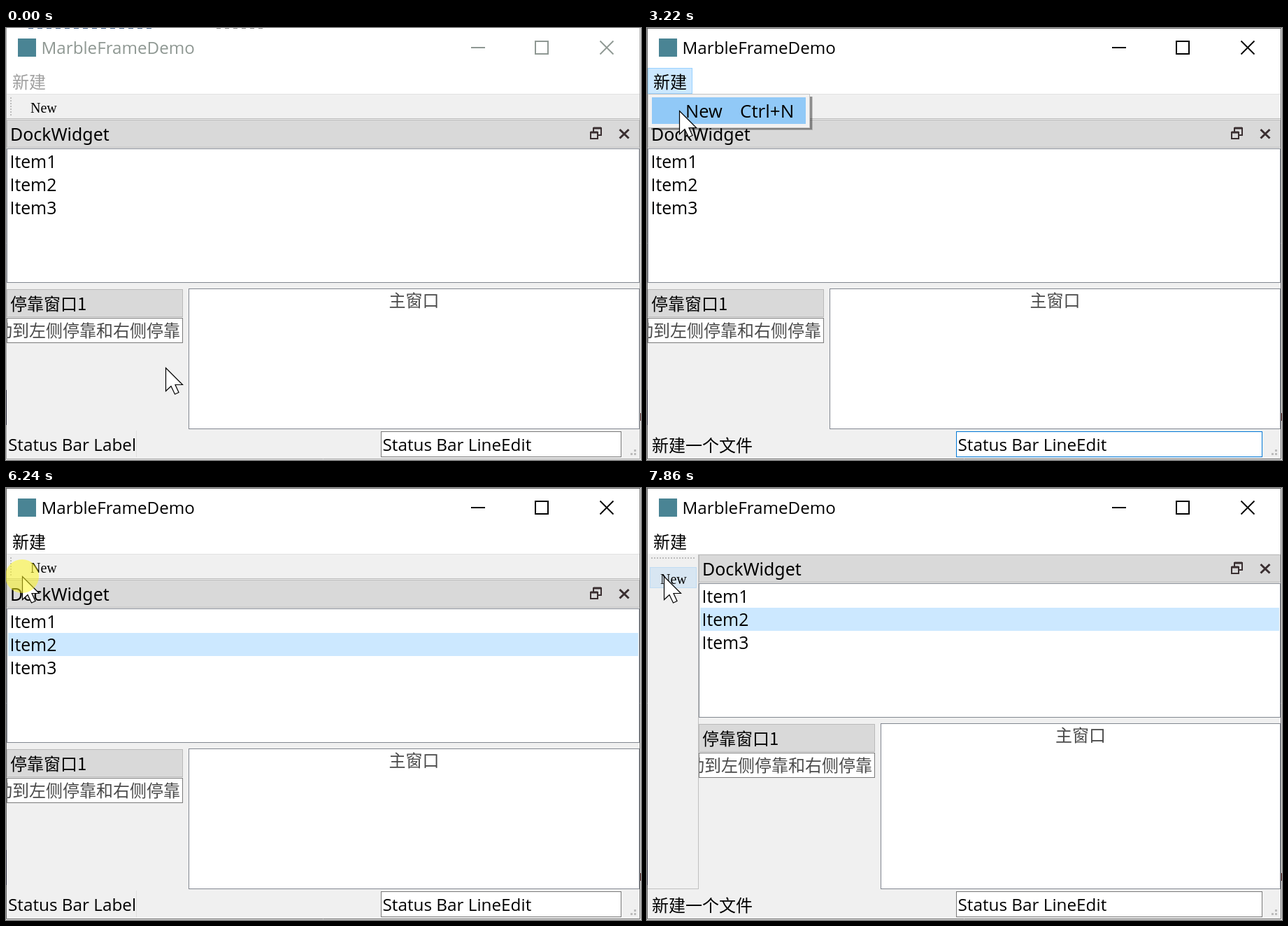
Recreate the animation shown at these times as an HTML page with a canvas. Size 908 px wide and 617 px high, loop 8000 ms.

```html
<!DOCTYPE html>
<html lang="zh">
<head>
<meta charset="utf-8">
<style>
html, body { margin: 0; width: 100%; height: 100%; overflow: hidden; background: #fff; }
canvas { display: block; }
</style>
</head>
<body>
<canvas id="stage" width="908" height="617"></canvas>
<script>
const ctx = document.getElementById('stage').getContext('2d');
const LOOP = 8000, ACTIVATED = 2000, SELECTED = 4090, DOCKED = 7640;
const UI = '"Open Sans", "Noto Sans CJK SC", "Noto Sans CJK", sans-serif';
const CJK = '"Noto Sans CJK SC", "Noto Sans CJK", sans-serif';
const SERIF = '"Liberation Serif", serif';
const THIN_INK = '#4a4a4a';

// [time, pointer x, pointer y, flags]
// c click halo, x move pointer, h/p tool button hover/press, u menu title hover,
// m menu open, n menu entry lit, f toolbar floating, 1-3 hovered list row
const steps = [
  [0, 228, 485, ''], [200, 218, 445, ''], [400, 196, 375, ''], [600, 172, 305, ''],
  [800, 152, 240, '2'], [1000, 125, 178, '1'], [1200, 105, 117, ''],
  [1400, 82, 103, ''], [1600, 60, 90, 'u'], [1800, 45, 83, 'u'],
  [2000, 40, 81, 'cum'], [2200, 40, 81, 'um'], [2420, 40, 81, 'um'],
  [2690, 41, 92, 'um'], [2890, 43, 104, 'umn'], [3090, 45, 113, 'umn'], [3220, 46, 118, 'umn'],
  [3690, 46, 118, 'cumn'], [3890, 66, 150, ''], [4090, 98, 212, 'c2'], [4290, 98, 212, '2'],
  [4440, 98, 168, ''], [4640, 48, 108, 'chp'], [4840, 48, 108, 'h'],
  [5640, 28, 117, 'x'], [5840, 23, 117, 'x'],
  [6240, 23, 126, 'c'], [6440, 42, 140, 'cxf'], [6640, 72, 157, 'cxf'], [6840, 95, 168, 'cxf'],
  [7040, 72, 156, 'cxf'], [7240, 44, 140, 'cxf'], [7440, 24, 126, 'cxf'],
  [7640, 24, 126, ''], [7860, 24, 126, 'h']
];

function fill(x, y, w, h, color) {
  ctx.fillStyle = color;
  ctx.fillRect(x, y, w, h);
}

// Filled box with a one-pixel border inside its edges
function box(x, y, right, bottom, color, border) {
  fill(x, y, right - x, bottom - y, border);
  fill(x + 1, y + 1, right - x - 2, bottom - y - 2, color);
}

function text(str, x, y, size = 24.3, family = UI, color = '#000', align = 'left') {
  ctx.font = `${size}px ${family}`;
  ctx.textAlign = align;
  ctx.fillStyle = color;
  ctx.fillText(str, x, y);
}

function lines(color, width, ...paths) {
  ctx.strokeStyle = color;
  ctx.lineWidth = width;
  ctx.beginPath();
  for (const [x, y, ...rest] of paths) {
    ctx.moveTo(x, y);
    for (let i = 0; i < rest.length; i += 2) ctx.lineTo(rest[i], rest[i + 1]);
  }
  ctx.stroke();
}

function polygon(points, x, y) {
  ctx.beginPath();
  for (const [px, py] of points) ctx.lineTo(x + px + .5, y + py + .5);
  ctx.closePath();
  ctx.fillStyle = '#fff';
  ctx.fill();
  ctx.strokeStyle = '#000';
  ctx.lineWidth = 1.2;
  ctx.stroke();
}

function dots(x, y, length, vertical) {
  for (let i = 0; i < length; i += 4)
    fill(x + (vertical ? 0 : i), y + (vertical ? i : 0), 2, 2, '#bcbcbc');
}

function titleBar(active) {
  const ink = active ? '#000' : '#8f9893';
  fill(17, 15, 26, 26, '#4a8494');
  text('MarbleFrameDemo', 50.5, 37, 24.2, UI, ink);
  lines(ink, 2, [665, 28, 685, 28], [757, 19, 775, 19, 775, 37, 757, 37, 757, 18]);
  lines(ink, 1.8, [849.5, 18.5, 868.5, 37.5], [868.5, 18.5, 849.5, 37.5]);
}

function toolButton(x, y, has) {
  if (has('h')) box(x, y, x + 67, y + 30, has('p') ? '#c3dcf0' : '#d8e6f2', '#c0dcf3');
  text('New', x + 15, y + 24, 20, SERIF);
}

function topToolbar(has) {
  fill(1, 94, 905, 1, '#e2e2e2');
  fill(1, 129, 905, 1, '#b8b8b8');
  dots(6, 99, 28, true);
  toolButton(20, 97, has);
}

function leftToolbar(has) {
  fill(73, 95, 1, 478, '#c0c0c0');
  fill(1, 572, 73, 1, '#c0c0c0');
  dots(6, 99, 63, false);
  toolButton(4, 113, has);
}

function floatingToolbar(x, y) {
  box(x, y, x + 91, y + 36, '#f0f0f0', '#c8c8c8');
  dots(x + 5, y + 5, 26, true);
  toolButton(x + 21, y + 2, flag => flag === 'h');
}

function docks(left, top, selected, has) {
  const x = 1 + left;
  box(x, 131 + top, 906, 171 + top, '#d9d9d9', '#bababa');
  text('DockWidget', x + 5, 161 + top, 24.9, '"Noto Sans", sans-serif');
  const icon = '#3a2f31', y = top + 151;
  lines(icon, 2, [836, y - 2, 846, y - 2, 846, y + 7, 836, y + 7, 836, y - 3],
    [840, y - 3, 840, y - 8, 851, y - 8, 851, y + 2, 847, y + 2]);
  lines(icon, 3, [836, y - 2, 846, y - 2], [840, y - 8, 851, y - 8],
    [877.5, y - 6, 890.5, y + 6.5], [890.5, y - 6, 877.5, y + 6.5]);

  box(x, 172 + top, 906, 364 + top, '#fff', '#828790');
  for (let i = 1; i <= 3; i++) {
    const rowY = 141 + 33 * i + top;
    const color = selected && i === 2 ? '#cce8ff' : has(String(i)) ? '#e5f3ff' : null;
    if (color) fill(x + 2, rowY, 902 - x, 33, color);
    text('Item' + i, x + 4.5, rowY + 26, 24.8);
  }

  box(x, 373 + top, x + 252, 413 + top, '#d9d9d9', '#bababa');
  text('停靠窗口1', x + 5, 403 + top, 24, CJK);
  box(x, 414 + top, x + 252, 450 + top, '#fff', '#7a7a7a');
  ctx.save();
  ctx.beginPath();
  ctx.rect(x + 1, 415 + top, 250, 34);
  ctx.clip();
  text('动到左侧停靠和右侧停靠', x + 248, 441 + top, 24, CJK, THIN_INK, 'right');
  ctx.restore();

  box(x + 260, 372 + top, 906, 573, '#fff', '#828790');
  text('主窗口', (x + 260 + 906) / 2, 398 + top, 24, CJK, THIN_INK, 'center');
}

function statusBar(hint, focused) {
  const x = hint ? 442 : 536;
  if (hint) {
    text('新建一个文件', 7, 605, 24, CJK);
  } else {
    text('Status Bar Label', 3, 604);
    fill(186, 575, 1, 38, '#e0e0e0');
  }
  box(x, 576, 880, 613, '#fff', focused ? '#0078d7' : '#7a7a7a');
  text('Status Bar LineEdit', x + 2.5, 604);
  for (const [dx, dy] of [[5, 0], [0, 5], [5, 5]]) fill(893 + dx, 602 + dy, 3, 3, '#bdbdbd');
}

function menu(lit) {
  fill(6, 98, 231, 48, 'rgba(0,0,0,.16)');
  fill(6, 98, 230, 47, 'rgba(0,0,0,.3)');
  box(1, 94, 233, 143, '#f2f2f2', '#c4c4c4');
  if (lit) fill(7, 99, 220, 38, '#91c9f7');
  text('New', 55, 128, 25.4);
  text('Ctrl+N', 133, 128, 26);
}

const arrow = [[0, 0], [0, 33], [7.5, 26], [13, 37.5], [18.5, 35], [13.5, 24], [24, 24]];
const arm = [[-4, -4], [-4, -14], [-9, -14], [0, -23], [9, -14], [4, -14]];
const cross = [0, 1, 2, 3].flatMap(turn => arm.map(([x, y]) => {
  for (let i = 0; i < turn; i++) [x, y] = [-y, x];
  return [x, y];
}));

function pointer(x, y, has) {
  polygon(has('x') ? cross : arrow, x, y);
  if (!has('c')) return;
  ctx.fillStyle = 'rgba(255,247,30,.52)';
  ctx.beginPath();
  ctx.arc(x, y, 24, 0, 7);
  ctx.fill();
}

// Window border, with slivers of the desktop showing around it
function frame(active) {
  const edge = active ? '#686868' : '#a6a6a6';
  fill(907, 0, 1, 617, '#e8e8e8');
  fill(0, 616, 908, 1, '#e8e8e8');
  lines(edge, 1, [.5, 0, .5, 615.5, 906.5, 615.5, 906.5, 0]);
  if (active) {
    fill(0, 0, 907, 1, edge);
  } else {
    for (let x = 32; x < 205; x += 13) fill(x, 0, 7, 1, '#40618c');
    for (let x = 301; x < 365; x += 12) fill(x, 0, 6, 1, '#8a8a8a');
  }
  fill(0, 517, 1, 50, '#303040');
  fill(907, 550, 1, 11, '#5a2a2a');
}

function draw(t) {
  const [, x, y, flags] = steps.findLast(step => step[0] <= t);
  const has = flag => flags.includes(flag);
  const active = t >= ACTIVATED;
  const shift = t >= 7040 ? 1 : t >= 6840 ? .39 : 0;

  fill(0, 0, 908, 617, '#fff');
  fill(1, 94, 905, 521, '#f0f0f0');
  titleBar(active);
  if (has('u')) box(1, 57, 65, 94, active ? '#cce8ff' : '#e5f3ff', '#99d1ff');
  text('新建', 9, 86, 24, CJK, active ? '#000' : '#a0a0a0');
  if (t >= DOCKED) leftToolbar(has);
  else if (!has('f')) topToolbar(has);
  docks(Math.round(73 * shift), -Math.ceil(36 * shift), t >= SELECTED, has);
  statusBar(has('h') || has('n'), active && t < SELECTED);
  if (has('f')) floatingToolbar(x - 7, y - 22);
  if (has('m')) menu(has('n'));
  frame(active);
  pointer(x, y, has);
}

const start = performance.now();
function tick() {
  draw((performance.now() - start) % LOOP);
  requestAnimationFrame(tick);
}
tick();
</script>
</body>
</html>
```
